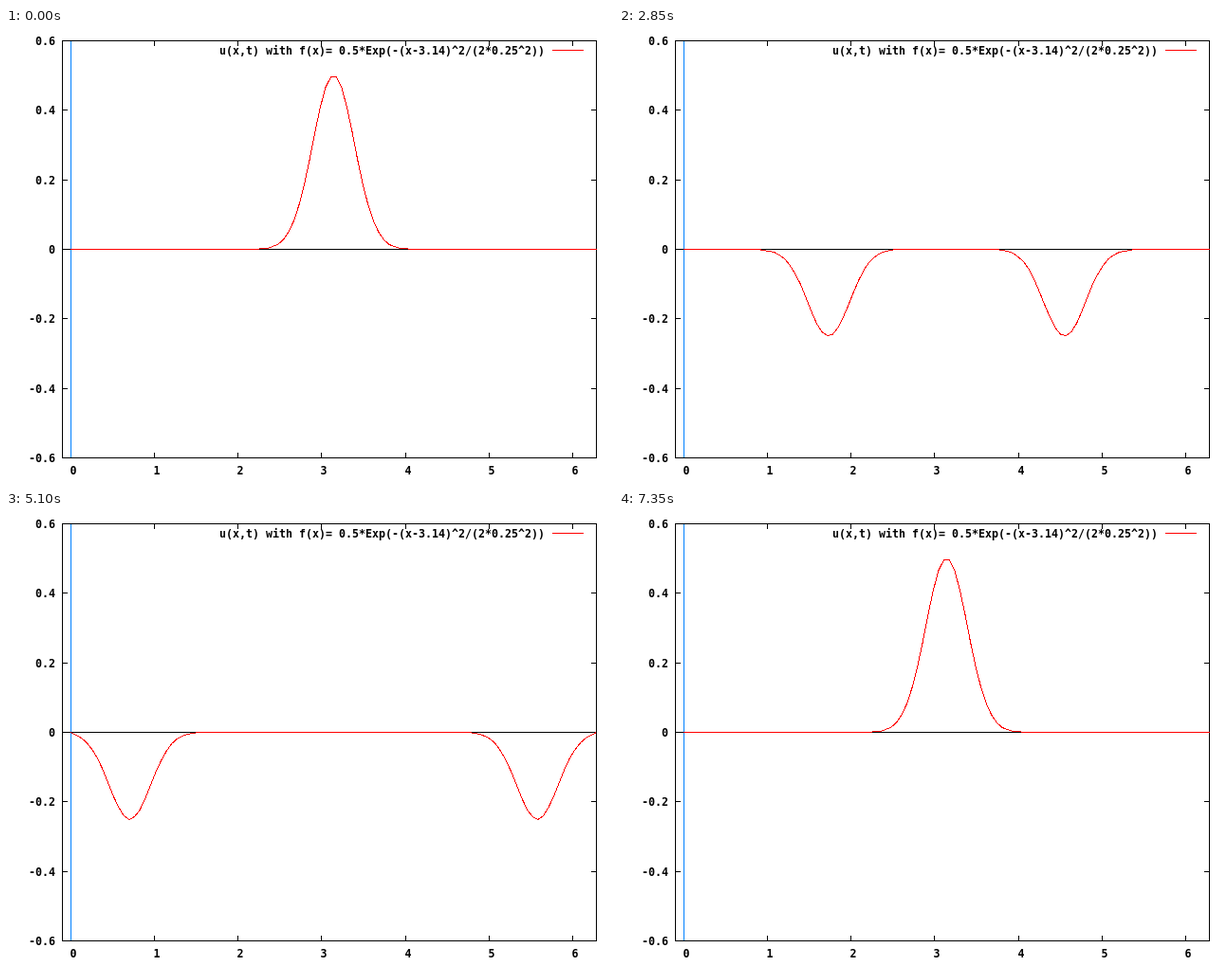
Animation, 640 px wide and 480 px high, one loop 7500 ms. Source, as an HTML page:

```html
<!DOCTYPE html>
<html lang="en">
<head>
<meta charset="utf-8">
<title>Wave on a string</title>
<style>
html, body { margin: 0; width: 100%; height: 100%; overflow: hidden; background: #fff; }
svg { display: block; width: 640px; height: 480px; }
path, polyline { fill: none; stroke: #000; stroke-width: 1; shape-rendering: crispEdges; }
text { font: bold 11.63px "DejaVu Sans Mono", monospace; white-space: pre; }
.end { text-anchor: end; }
#wave, #key { stroke: #f00; }
#wall { stroke: #0080ff; }
</style>
</head>
<body>
<svg viewBox="0 0 640 480">
  <path id="frame"/>
  <path id="zero" d="M59 233.5H622"/>
  <path id="wall" d="M68.5 14V453"/>
  <g id="labels"></g>
  <text class="end" x="568" y="28">u(x,t) with f(x)= 0.5*Exp(-(x-3.14)^2/(2*0.25^2))</text>
  <path id="key" d="M576 23.5H609"/>
  <polyline id="wave"/>
</svg>
<script>
const STEP = 150, STEPS = 50, SAMPLES = 100;
const LEN = 2 * Math.PI;
const el = id => document.getElementById(id);
const px = x => 59.5 + (x + 0.1) * 88.2;
const py = u => 233.5 - u * 366.67;

function drawAxes() {
  let d = "M59.5 13.5H622.5V453.5H59.5Z", labels = "";
  for (let x = 0; x <= 6; x++) {
    const p = Math.floor(px(x)) + 0.5;
    d += `M${p} 453V448M${p} 14V19`;
    labels += `<text x="${p - 1}" y="471">${x}</text>`;
  }
  for (let i = -3; i <= 3; i++) {
    const p = Math.floor(py(i / 5)) + 0.5;
    d += `M59 ${p}H65M623 ${p}H617`;
    labels += `<text class="end" x="52" y="${p + 4.5}">${i ? (i / 5).toFixed(1) : 0}</text>`;
  }
  el("frame").setAttribute("d", d);
  el("labels").innerHTML = labels;
}

// Odd, periodic extension of the initial bump keeps both ends fixed.
function bump(x) {
  const y = ((x % (2 * LEN)) + 2 * LEN) % (2 * LEN);
  const g = c => 0.5 * Math.exp(-((y - c) ** 2) / (2 * 0.25 ** 2));
  return g(LEN / 2) - g(LEN * 1.5);
}

function drawWave(step) {
  const shift = 2 * LEN * step / (STEPS - 1);
  const points = [];
  for (let i = 0; i < SAMPLES; i++) {
    const x = LEN * i / (SAMPLES - 1);
    const u = (bump(x - shift) + bump(x + shift)) / 2;
    points.push(px(x).toFixed(2) + "," + (Math.round(py(u) - 0.5) + 0.5));
  }
  el("wave").setAttribute("points", points.join(" "));
}

function tick() {
  drawWave(Math.floor(performance.now() / STEP) % STEPS);
  requestAnimationFrame(tick);
}

drawAxes();
tick();
</script>
</body>
</html>
```
